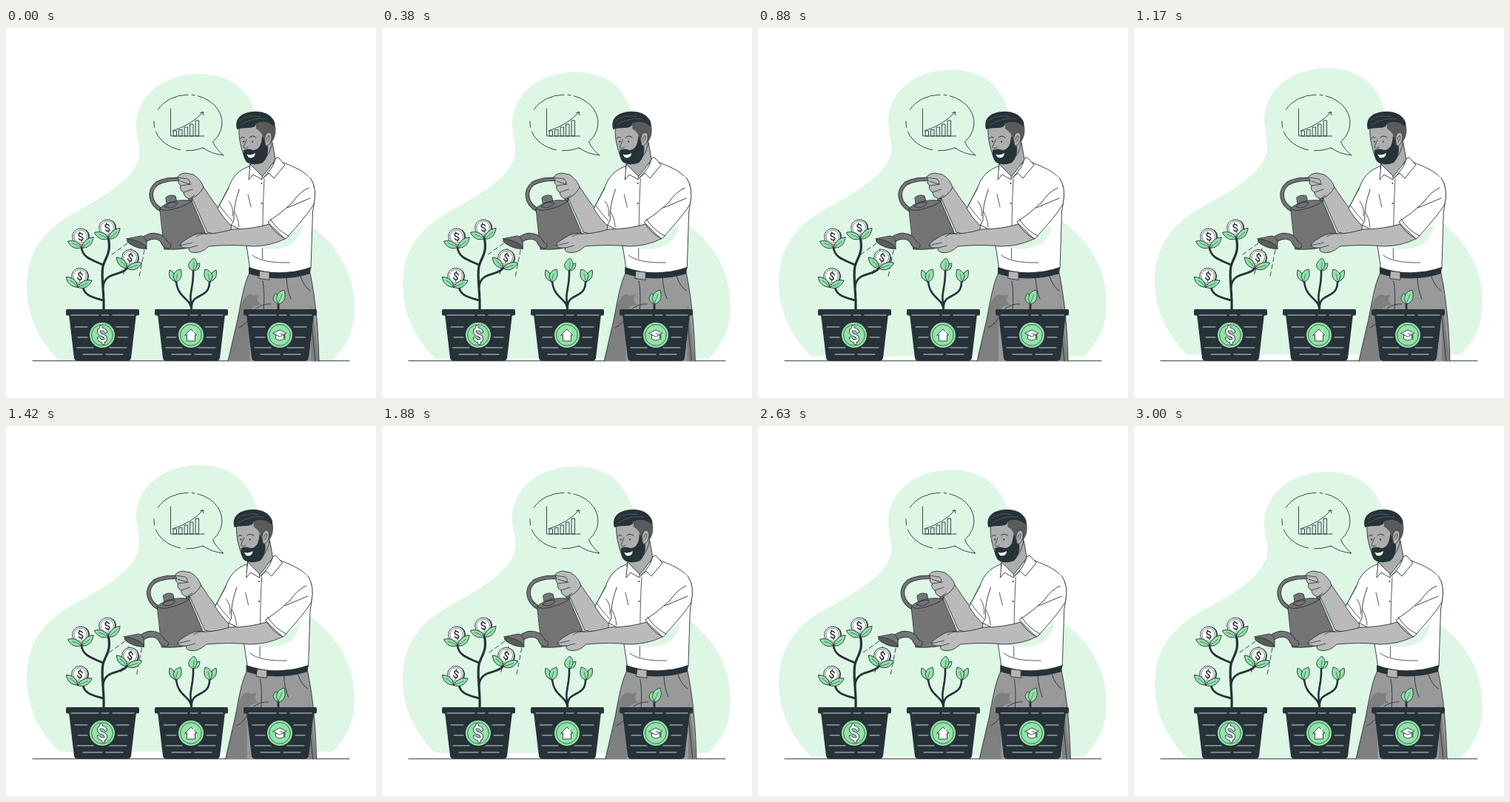
Write an HTML page with a canvas that moves like this. It is 500 px wide and 500 px high and loops after 3040 ms.

```html
<!DOCTYPE html>
<html lang="en">
<head>
<meta charset="utf-8">
<title>Watering the savings plants</title>
<style>
html, body { margin: 0; width: 100%; height: 100%; overflow: hidden; background: #fff; }
canvas { display: block; width: 100vmin; height: 100vmin; }
</style>
</head>
<body>
<canvas id="stage"></canvas>
<script>
const LOOP = 3040;
const INK = '#263238', GREEN = '#92e3a9', PALE = '#def7e5', WHITE = '#fff';
const FACE = '#adadad', SKIN = '#bababa', METAL = '#747474', CLOTH = '#999', SHADE = '#7f7f7f';
const canvas = document.getElementById('stage');
const ctx = canvas.getContext('2d');

function resize() {
  const side = Math.min(innerWidth, innerHeight) || 500;
  canvas.width = canvas.height = Math.round(side * (devicePixelRatio || 1));
}
addEventListener('resize', resize);
resize();

const cache = {};
function draw(d, fill, stroke, width = 1) {
  const path = cache[d] || (cache[d] = new Path2D(d));
  if (fill) { ctx.fillStyle = fill; ctx.fill(path); }
  if (stroke) { ctx.strokeStyle = stroke; ctx.lineWidth = width; ctx.stroke(path); }
}
const shape = (d, fill) => draw(d, fill, INK, 0.9);
const line = (d, width = 0.9, color = INK) => draw(d, null, color, width);

// Thick stroke with a dark rim
function tube(d, width, color, rim = 0.9) {
  line(d, width + rim, INK);
  line(d, width - rim, color);
}

function disc(x, y, r, fill, stroke, width = 1) {
  ctx.beginPath();
  ctx.arc(x, y, r, 0, 7);
  if (fill) { ctx.fillStyle = fill; ctx.fill(); }
  if (stroke) { ctx.strokeStyle = stroke; ctx.lineWidth = width; ctx.stroke(); }
}

function at(x, y, angle, fn) {
  ctx.save();
  ctx.translate(x, y);
  ctx.rotate(angle);
  fn();
  ctx.restore();
}

// CSS "ease" curve: cubic-bezier(.25, .1, .25, 1)
function ease(x) {
  let lo = 0, hi = 1, u = x;
  for (let i = 0; i < 24; i++) {
    u = (lo + hi) / 2;
    const bx = 0.75 * u * (1 - u) + u ** 3;
    if (bx < x) lo = u; else hi = u;
  }
  return 0.3 * u * (1 - u) ** 2 + 3 * u * u * (1 - u) + u ** 3;
}

const SHAKE = [0, -1, 2, -4, 4, -4, 4, -4, 2, -1, 0];
function shake(p) {
  const i = Math.min(9, Math.floor(p * 10));
  return SHAKE[i] + (SHAKE[i + 1] - SHAKE[i]) * ease(p * 10 - i);
}

function blob() {
  draw('M262 62C210 62 176 94 176 131C176 150 183 160 179 178C169 210 118 235 85 254C48 276 28 306 28 350C28 390 46 424 72 449.300H441C463 428 471 405 471 378C471 330 447 294 414 269C378 242 357 205 349 165C342 128 338 108 323 88C308 70 286 62 262 62Z', PALE);
}

function bubble() {
  const arcs = [[-1.28, 0.75], [-1.46, -1.37], [-2.65, -1.57], [2.98, 3.2], [1.8, 2.82], [1.12, 1.62]];
  ctx.strokeStyle = INK;
  ctx.lineWidth = 0.9;
  for (const [a, b] of arcs) {
    ctx.beginPath();
    ctx.ellipse(246, 128, 46, 37.8, 0, a, b);
    ctx.stroke();
  }
  line('M279.500 154Q284 164 294 172Q279 170.500 266 162', 0.9);
  line('M222.500 109V146H268', 0.9);
  [7, 8.5, 12, 16, 21].forEach((h, i) => {
    ctx.strokeRect(226.5 + i * 7.5, 146 - h, 4, h);
  });
  line('M225 139Q251 131 266 114M262.500 114.500L266.500 113.500L266.500 117.500');
}

function pants() {
  draw('M329 331C321 346 317 374 313 394L300 450H423C422 410 419 370 411 331Z', CLOTH);
  draw('M318 373Q323 360 331 360Q336 363 343 360Q336 369 345 374Q333 374 329 384V450H300L313 394Z', SHADE);
  draw('M413 372L423 450H412Z', SHADE);
  line('M329 331C321 346 317 374 313 394L300 450M411 331C419 370 422 410 423 450M411 380L418 450');
  line('M347 342Q350 360 348 382M398 336Q403 350 411 355M379 338Q380 355 385 366M315 405Q326 400 333 385M338 379Q348 372 358 373');
}

function torso() {
  shape('M331 186C315 191 306 201 301 215L286 244Q294 255 304 266L316 272L325 294L330 327Q368 336 412 325L414.500 248Q419 226 416 213C411 196 392 189 375 182Z', WHITE);
  draw('M345 296Q362 293 376 286Q389 276 401 265Q400 279 388 291Q373 301 345 298Z', PALE);
  draw('M330 190L331 202L338 197L347 205L357 198L363 204L372 190Z', PALE);
  line('M315 218Q305 243 302 261M307 246Q314 255 315 269M327 225L331 242M349 204Q347 244 347 272M333 307Q346 318 383 317', 0.8);
  for (const y of [210, 237]) disc(345.500, y, 1, INK);
  line('M346.500 298V312', 0.8);
  draw('M328 323Q370 338 412 323L411 332Q369 345 328 332Z', INK);
  draw('M343 328.500L356 330V340.500L342 338.500Z', '#b5b5b5', INK, 0.9);
}

function head() {
  shape('M331 178L329 190Q336 193 346 201Q354 192 364 178L360 155L335 172Z', FACE);
  shape('M330 184L328 205L334 198Q341 202 346 205L346 200Q336 190 330 184Z', WHITE);
  shape('M368 175L377 185L362 203L355 196L347 203Q361 190 364 177Z', WHITE);
  shape('M315 136C314 149 318 163 322 174Q330 185 345 181Q359 170 360 150L357 127L328 126Z', FACE);
  draw('M338 128Q357 124 364 132Q366 145 360 153L356 154L351 148L347 151Q348 142 338 136Z', '#5a5a5a');
  draw('M346 146Q350 150 350 158L354 160Q355 174 347 182Q334 187 325 181Q320 175 321 165Q327 162 334 165Q345 165 346 146Z', INK);
  draw('M325 170.500Q331 173 337 169Q336 177 328 175Z', WHITE);
  shape('M349.500 150C350 139 358 139 359 145C360 153 355 161 351 159Z', FACE);
  line('M352 151Q353 145 356 146Q357 150 353 154', 0.7);
  draw('M312 137C309 126 314 118 324 115C338 110 356 113 362 125Q365 131 362 133Q352 123 338 129Q338 135 326 135Q318 135 312 137Z', INK);
  line('M316 125Q327 116 344 120M317 131Q334 120 352 123', 0.6, '#607880');
  line('M317 149Q319 146 322 148M329 148Q333 144 338 148', 1);
  disc(321, 153.500, 1.1, INK);
  disc(333, 153.500, 1.1, INK);
  line('M325 151Q322 158 321 161Q324 164 327 161', 0.8);
}

function can() {
  tube('M210 246C195 238 191 221 204 210C216 203 230 205 244 204Q250 207 249 235', 4.6, METAL);
  shape('M216 229Q222 224 229 227L231 235L218 240Z', METAL);
  shape('M208 244C214 236 236 230 251 234L269 276L266 292Q240 301 214 299Z', METAL);
  line('M208 244Q214 249 229 244Q244 240 251 234');
  shape('M215 241Q221 234 232 236Q231 241 222 243Z', METAL);
  tube('M187 286C196 279 208 280 213 288Q215 293 219 294', 8, METAL);
  shape('M183 281Q188 282 190 289L190 299L163 285Z', METAL);
  at(176.5, 292, 0.38, () => {
    ctx.beginPath();
    ctx.ellipse(0, 0, 14, 4, 0, 0, 7);
    ctx.fillStyle = '#5b5b5b';
    ctx.fill();
    ctx.strokeStyle = INK;
    ctx.lineWidth = 0.8;
    ctx.stroke();
  });
}

function drops() {
  ctx.setLineDash([6, 4]);
  line('M164 291L143 306M169 298L158 335M187 300L180 336', 0.9);
  ctx.setLineDash([]);
}

function arms() {
  // rear arm and gripping hand
  shape('M255 209L267 215Q276 229 288 245L304 265Q306 273 300 276Q285 280 272 276L251 229Z', SKIN);
  shape('M232 202Q233 197 243 196L253 198Q263 204 267 215Q261 227 249 231Q240 229 240 222Q234 219 236 213Q231 209 234 206Z', SKIN);
  line('M232 202L246 204Q250 207 248 211L236 207M236 213L250 211M240 222L252 218M249 230L255 226', 0.8);
  shape('M301 216L286 244Q293 256 304 267L308 260Q307 240 315 219', WHITE);
  line('M288 239Q297 252 306 261M301 234Q308 242 306 254', 0.8);

  // front arm and supporting hand
  shape('M356 265Q332 272 306 272Q286 278 272 278Q259 275 246 284Q236 290 235 294Q238 298 248 297Q245 301 251 303Q263 306 274 295Q306 292 333 295Q357 295 377 285Z', SKIN);
  line('M235 294L252 290M248 297L259 294M272 278Q263 277 257 282', 0.8);
  draw('M387 205Q399 194 411 202Q421 217 416 238Q408 252 378 285L354 262Q371 251 384 237Z', WHITE);
  line('M411 202Q421 217 416 238Q408 252 378 285Q363 278 354 262Q371 251 387 236M357 258Q366 273 382 281M387 236Q397 221 409 216M380 243L411 230', 0.9);
}

function leafCup(x, y, angle) {
  at(x, y, angle, () => {
    shape('M0 15C-8 17 -15 13 -18 5C-10 3 -2 7 0 15Z', GREEN);
    shape('M0 15C8 17 15 12 17 2C9 2 2 7 0 15Z', GREEN);
    line('M0 15Q-6 10 -12 8M0 15Q7 11 12 7', 0.6);
  });
}

function dollar(scale, fill, rim) {
  const d = 'M4.800 -4.500Q3.500 -8 -1 -8C-6.500 -8 -6 -2 0 0C6 2 6.500 8 1 8Q-3.500 8 -4.800 4.500M-1.500 -11V-8M1.500 8V11';
  ctx.save();
  ctx.scale(scale, scale);
  if (rim) line(d, 4.6, INK);
  line(d, 2.8, fill);
  ctx.restore();
}

function coin(x, y, angle) {
  at(x, y, angle, () => {
    disc(1, 0, 11, INK);
    disc(-0.3, 0, 11, WHITE, INK, 0.9);
    disc(-0.3, 0, 8.8, null, INK, 0.6);
    dollar(0.56, INK);
  });
  leafCup(x, y, angle);
}

function coinPlant() {
  line('M132 382C133 355 128 338 131 322C134 310 143 304 138 283', 3.2);
  line('M131 320C118 314 103 311 102 296M131 350C134 328 156 336 164 324M131 368C118 364 106 362 104 350', 2.8);
  coin(101, 282, -0.08);
  coin(137, 270, -0.08);
  coin(168, 310.500, 0.3);
  coin(100, 335.500, 0.22);
}

function bud(x, y, flip) {
  ctx.save();
  ctx.translate(x, y);
  ctx.scale(flip, 1);
  shape('M1 9Q-10 5 -7 -7Q1 -5 1 9Z', GREEN);
  shape('M1 9C-4 2 -2 -6 8 -8C11 1 8 8 1 9Z', GREEN);
  line('M1 9L4 -2', 0.6);
  ctx.restore();
}

function youngPlant() {
  line('M251 382C250 364 232 366 230 342M251 378C246 357 254 352 253 327M251 375C252 358 276 366 275 342', 2.6);
  bud(228, 334, 1);
  shape('M253 328Q253 318 262 318Q262 328 253 328Z', GREEN);
  shape('M253 328C244 325 245 317 254 311C261 318 258 325 253 328Z', GREEN);
  line('M253 327L254 317', 0.6);
  bud(277, 334, -1);
}

function sprout() {
  line('M368 382V371', 2.8);
  shape('M368 373C359 370 360 362 365 359Q370 364 368 373Z', GREEN);
  shape('M368 373C362 363 368 356 376 354C379 365 376 372 368 373Z', GREEN);
  line('M368 372L373 360', 0.6);
}

const ICONS = [
  () => dollar(1, WHITE, true),
  () => {
    shape('M-8 0L0 -8L8 0H5.500V8H-5.500V0Z', WHITE);
    line('M4 -7V-4', 1.2, WHITE);
  },
  () => {
    shape('M-5.500 0V5Q0 9 5.500 5V0Z', WHITE);
    shape('M-9 -2.500L0 -7L9 -2.500L0 2Z', WHITE);
    line('M0 -2.500L7 0V6', 0.8);
  }
];

function pot(x, icon) {
  at(x, 415, 0, () => {
    draw('M-45 -28H46L39 31Q38 35 34 35H-33Q-37 35 -38 31Z', INK);
    ctx.beginPath();
    ctx.roundRect(-49, -35, 99, 8.5, 2);
    ctx.fillStyle = INK;
    ctx.fill();
    line('M-42 -27H-5M-1 -27H9M14 -27H43M-37 -11H-20M19 -11H36M-33 3H-20M21 3H34M-34 17H-12M10 17H33M-26 26H0M5 26H28', 0.9, '#e6e9ea');
    disc(0, 0, 17, GREEN);
    disc(0, 0, 14.3, null, INK, 0.7);
    icon();
  });
}

function render(now) {
  const p = (now % LOOP) / LOOP;
  const scale = canvas.width / 500;
  ctx.setTransform(scale, 0, 0, scale, 0, 0);
  ctx.lineCap = ctx.lineJoin = 'round';
  ctx.fillStyle = WHITE;
  ctx.fillRect(0, 0, 500, 500);

  at(0, -10 * (1 - Math.abs(2 * p - 1)), 0, blob);
  bubble();
  line('M36 449.800H464', 1);
  at(shake(p), 0, 0, () => {
    drops();
    pants();
    torso();
    head();
    can();
    arms();
  });
  coinPlant();
  youngPlant();
  sprout();
  ICONS.forEach((icon, i) => pot(130 + i * 120, icon));
}

function frame() {
  render(performance.now());
  requestAnimationFrame(frame);
}
frame();
</script>
</body>
</html>
```
